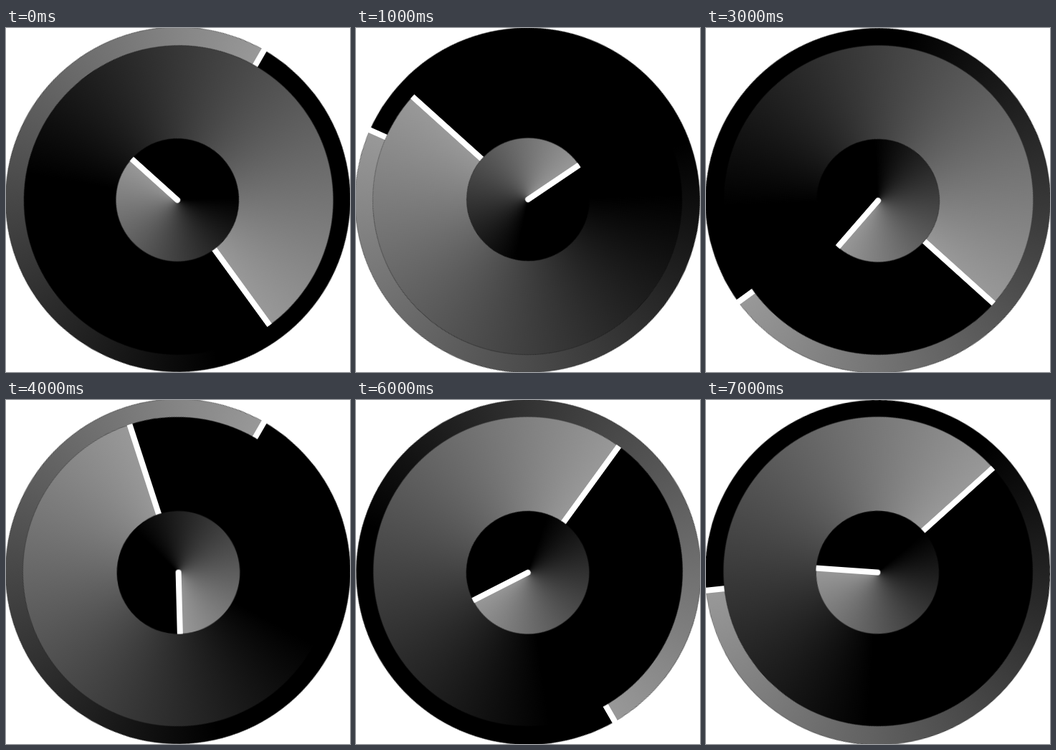
An HTML page that plays this animation: 480 px wide and 480 px high, repeating every 8000 ms.

```html
<!DOCTYPE html>
<html lang="en">
<head>
<meta charset="utf-8">
<title>Sweep clock</title>
<style>
  html, body {
    margin: 0;
    width: 100%;
    height: 100%;
    overflow: hidden;
    background: #fff;
  }
  .dial {
    position: relative;
    width: 480px;
    height: 480px;
    overflow: hidden;
  }
  /* Each disc turns about the stage centre, its face slightly off axis. */
  .disc {
    position: absolute;
    inset: -1px;
    clip-path: circle(var(--r));
    background:
      radial-gradient(circle, #0000 calc(var(--r) - 1px), #0009 var(--r)),
      conic-gradient(#000 0 136deg, #999 360deg);
    transform: translate(-.6px, -.6px);
    animation: 8s step-end infinite;
  }
  .disc::before {
    content: "";
    position: absolute;
    left: calc(50% - 4px);
    top: 0;
    width: 8px;
    height: calc(50% + 4px);
    border-radius: 0 0 4px 4px;
    background: #fff;
  }
  .seconds { --r: 240.7px; animation-name: seconds; }
  .minutes { --r: 216px; animation-name: minutes; }
  .hours { --r: 86px; animation-name: hours; }

  @keyframes seconds {
    0% { rotate: 30deg; }
    12.5% { rotate: 294deg; }
    25% { rotate: 330deg; }
    37.5% { rotate: 234deg; }
    50% { rotate: 30deg; }
    62.5% { rotate: 228deg; }
    75% { rotate: 150deg; }
    87.5%, 100% { rotate: 264deg; }
  }
  @keyframes minutes {
    0% { rotate: 144deg; }
    12.5% { rotate: 312deg; }
    25% { rotate: 60deg; }
    37.5% { rotate: 132deg; }
    50% { rotate: 342deg; }
    62.5% { rotate: 108deg; }
    75% { rotate: 36deg; }
    87.5%, 100% { rotate: 48deg; }
  }
  @keyframes hours {
    0% { rotate: 312deg; }
    12.5% { rotate: 56deg; }
    25% { rotate: 125deg; }
    37.5% { rotate: 221deg; }
    50% { rotate: 178.5deg; }
    62.5% { rotate: 339deg; }
    75% { rotate: 243deg; }
    87.5%, 100% { rotate: 274deg; }
  }
</style>
</head>
<body>
<div class="dial">
  <div class="disc seconds"></div>
  <div class="disc minutes"></div>
  <div class="disc hours"></div>
</div>
</body>
</html>
```
